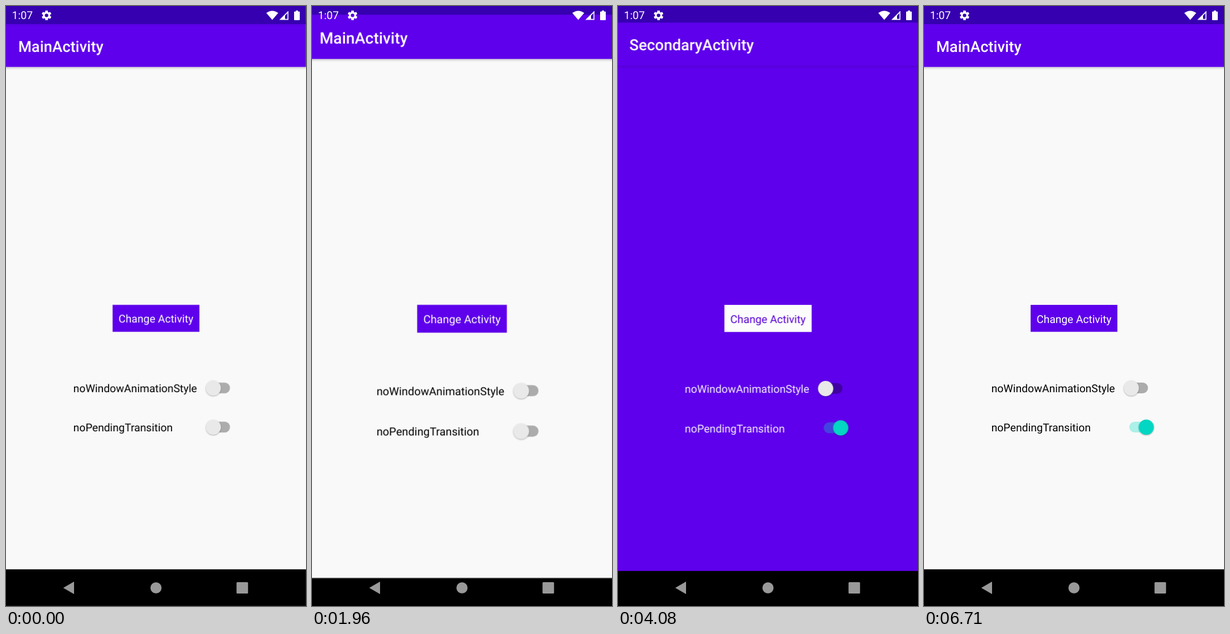
These frames come from a looping animation (529 by 1058 pixels, 6.97 s). An HTML page:

```html
<!DOCTYPE html>
<html lang="en">
<head>
<meta charset="utf-8">
<title>Activity transitions</title>
<style>
html, body { margin: 0; width: 100%; height: 100%; overflow: hidden; background: #000; }
#stage { position: fixed; inset: 0; overflow: hidden; contain: strict; }
svg { position: absolute; left: 0; top: 0; width: 529px; height: 1058px; overflow: hidden; }
text { font: 19.1px Roboto, sans-serif; text-rendering: geometricPrecision; }
.title { font-size: 26.94px; font-weight: 500; fill: #fff; }

#main { --page: #f9f9f9; --ink: #000; --button: #5e00eb; --caption: #fff; --shade: .16; }
#second { --page: #5e00eb; --ink: #f6f0ff; --button: #fcfcfc; --caption: #5600d6; --shade: .1; }
.page { fill: var(--page); }
.label { fill: var(--ink); }
.button { fill: var(--button); }
.caption { fill: var(--caption); }
.bar { fill: #5e00eb; }
.status { fill: #3600b0; }
.shade { fill: url(#fall); opacity: var(--shade); }
.track { fill: #000; fill-opacity: .31; }
.thumb { fill: #e9e9e9; filter: drop-shadow(0 1.4px 1.2px rgba(0, 0, 0, .3)); }

/* One 6970 ms loop; each screen change lasts 400 ms, split in two easing parts */
#main { animation: mainScale 6.97s infinite, mainFade 6.97s linear infinite, mainOrder 6.97s step-end infinite; }
#second { z-index: 1; animation: secondScale 6.97s infinite, secondFade 6.97s linear infinite; }
.toggle .thumb { animation: slide 6.97s ease-in-out infinite; }
.toggle .track { animation: tint 6.97s linear infinite; }
#icons { z-index: 9; }

@keyframes mainScale {
  0% { transform: scale(1); }
  14.318% { transform: scale(1); animation-timing-function: cubic-bezier(.3, 0, .8, .15); }
  15.275% { transform: scale(.96); animation-timing-function: cubic-bezier(.05, .7, .1, 1); }
  20.057%, 26.943% { transform: scale(.9); }
  26.944% { transform: scale(1.1); animation-timing-function: cubic-bezier(.3, 0, .8, .15); }
  27.901% { transform: scale(1.06); animation-timing-function: cubic-bezier(.05, .7, .1, 1); }
  32.683% { transform: scale(1); }
  55.811% { transform: scale(1); animation-timing-function: cubic-bezier(.3, 0, .8, .15); }
  56.767% { transform: scale(.96); animation-timing-function: cubic-bezier(.05, .7, .1, 1); }
  61.549%, 72.969% { transform: scale(.9); }
  72.97% { transform: scale(1.1); animation-timing-function: cubic-bezier(.3, 0, .8, .15); }
  73.926% { transform: scale(1.06); animation-timing-function: cubic-bezier(.05, .7, .1, 1); }
  78.709%, 100% { transform: scale(1); }
}
@keyframes mainFade {
  0%, 14.806% { opacity: 1; }
  15.481%, 26.943% { opacity: 0; }
  26.944%, 56.298% { opacity: 1; }
  56.973%, 72.969% { opacity: 0; }
  72.97%, 100% { opacity: 1; }
}
@keyframes mainOrder {
  0% { z-index: 2; }
  26.944% { z-index: 0; }
  55.811% { z-index: 2; }
  72.97%, 100% { z-index: 0; }
}
@keyframes secondScale {
  0% { transform: scale(1.1); }
  14.318% { transform: scale(1.1); animation-timing-function: cubic-bezier(.3, 0, .8, .15); }
  15.275% { transform: scale(1.06); animation-timing-function: cubic-bezier(.05, .7, .1, 1); }
  20.057% { transform: scale(1); }
  26.944% { transform: scale(1); animation-timing-function: cubic-bezier(.3, 0, .8, .15); }
  27.901% { transform: scale(.96); animation-timing-function: cubic-bezier(.05, .7, .1, 1); }
  32.683%, 55.81% { transform: scale(.9); }
  55.811% { transform: scale(1.1); animation-timing-function: cubic-bezier(.3, 0, .8, .15); }
  56.767% { transform: scale(1.06); animation-timing-function: cubic-bezier(.05, .7, .1, 1); }
  61.549% { transform: scale(1); }
  72.97% { transform: scale(1); animation-timing-function: cubic-bezier(.3, 0, .8, .15); }
  73.926% { transform: scale(.96); animation-timing-function: cubic-bezier(.05, .7, .1, 1); }
  78.709%, 100% { transform: scale(.9); }
}
@keyframes secondFade {
  0%, 14.317% { opacity: 0; }
  14.318%, 27.432% { opacity: 1; }
  28.106%, 55.81% { opacity: 0; }
  55.811%, 73.458% { opacity: 1; }
  74.132%, 100% { opacity: 0; }
}
@keyframes slide {
  0%, 39.455% { transform: none; fill: #e9e9e9; }
  43.042%, 100% { transform: translateX(26.4px); fill: #03d6c2; }
}
@keyframes tint {
  0%, 39.455% { fill: #000; }
  43.042%, 100% { fill: #03dac5; }
}
</style>
</head>
<body>
<div id="stage">
<svg id="main" viewBox="0 0 529 1058">
  <defs>
    <linearGradient id="fall" x2="0" y2="1">
      <stop stop-color="#000"/>
      <stop offset="1" stop-color="#000" stop-opacity="0"/>
    </linearGradient>
  </defs>
  <rect class="page" width="529" height="1058"/>
  <rect class="shade" y="107.5" width="529" height="5"/>
  <rect class="bar" y="30" width="529" height="77.5"/>
  <rect class="status" width="529" height="32"/>
  <text class="title" x="21.5" y="81">MainActivity</text>
  <rect class="button" x="188" y="527" width="153" height="47.5"/>
  <text class="caption" x="198.5" y="558.5">Change Activity</text>
  <text class="label" x="118.7" y="681.3">noWindowAnimationStyle</text>
  <g>
    <rect class="track" x="362" y="664" width="33" height="19" rx="9.5"/>
    <circle class="thumb" cx="365.5" cy="673.7" r="13.4"/>
  </g>
  <text class="label" x="118.7" y="750.3">noPendingTransition</text>
  <g class="toggle">
    <rect class="track" x="362" y="733" width="33" height="19" rx="9.5"/>
    <circle class="thumb" cx="365.5" cy="742.7" r="13.4"/>
  </g>
  <rect y="993.3" width="529" height="65"/>
</svg>

<svg id="second" viewBox="0 0 529 1058">
  <rect class="page" width="529" height="1058"/>
  <rect class="shade" y="107.5" width="529" height="5"/>
  <rect class="bar" y="30" width="529" height="77.5"/>
  <rect class="status" width="529" height="32"/>
  <text class="title" x="21.5" y="81">SecondaryActivity</text>
  <rect class="button" x="188" y="527" width="153" height="47.5"/>
  <text class="caption" x="198.5" y="558.5">Change Activity</text>
  <text class="label" x="118.7" y="681.3">noWindowAnimationStyle</text>
  <g>
    <rect class="track" x="362" y="664" width="33" height="19" rx="9.5"/>
    <circle class="thumb" cx="365.5" cy="673.7" r="13.4"/>
  </g>
  <text class="label" x="118.7" y="750.3">noPendingTransition</text>
  <g class="toggle">
    <rect class="track" x="362" y="733" width="33" height="19" rx="9.5"/>
    <circle class="thumb" cx="365.5" cy="742.7" r="13.4"/>
  </g>
  <rect y="993.3" width="529" height="65"/>
</svg>

<svg id="icons" viewBox="0 0 529 1058" fill="#fff">
  <text x="10.5" y="23.4">1:07</text>
  <g transform="translate(71.5 16.5)" fill="none" stroke="#fff">
    <circle r="4.8" stroke-width="3.4"/>
    <path d="M0-8.6V-5.5M0 8.6V5.5M7.4-4.3L4.8-2.8M-7.4 4.3L-4.8 2.8M7.4 4.3L4.8 2.8M-7.4-4.3L-4.8-2.8" stroke-width="4.4"/>
  </g>
  <path d="M459 12.2Q469.5 4.6 480 12.2L469.5 24.6Z"/>
  <path d="M498 8.6V24.4H482Z"/>
  <path d="M496.4 12.6V22.8H492V17Z" fill="#3600b0"/>
  <path d="M511 8h4v1.8h2q1 0 1 1V24q0 1-1 1h-8q-1 0-1-1V10.8q0-1 1-1h2Z"/>
  <g fill="#999">
    <path d="M101 1026L120 1015V1037Z"/>
    <circle cx="264.5" cy="1026" r="9.8"/>
    <rect x="406.5" y="1016" width="20.3" height="20" rx="1.5"/>
  </g>
</svg>
</div>
</body>
</html>
```
